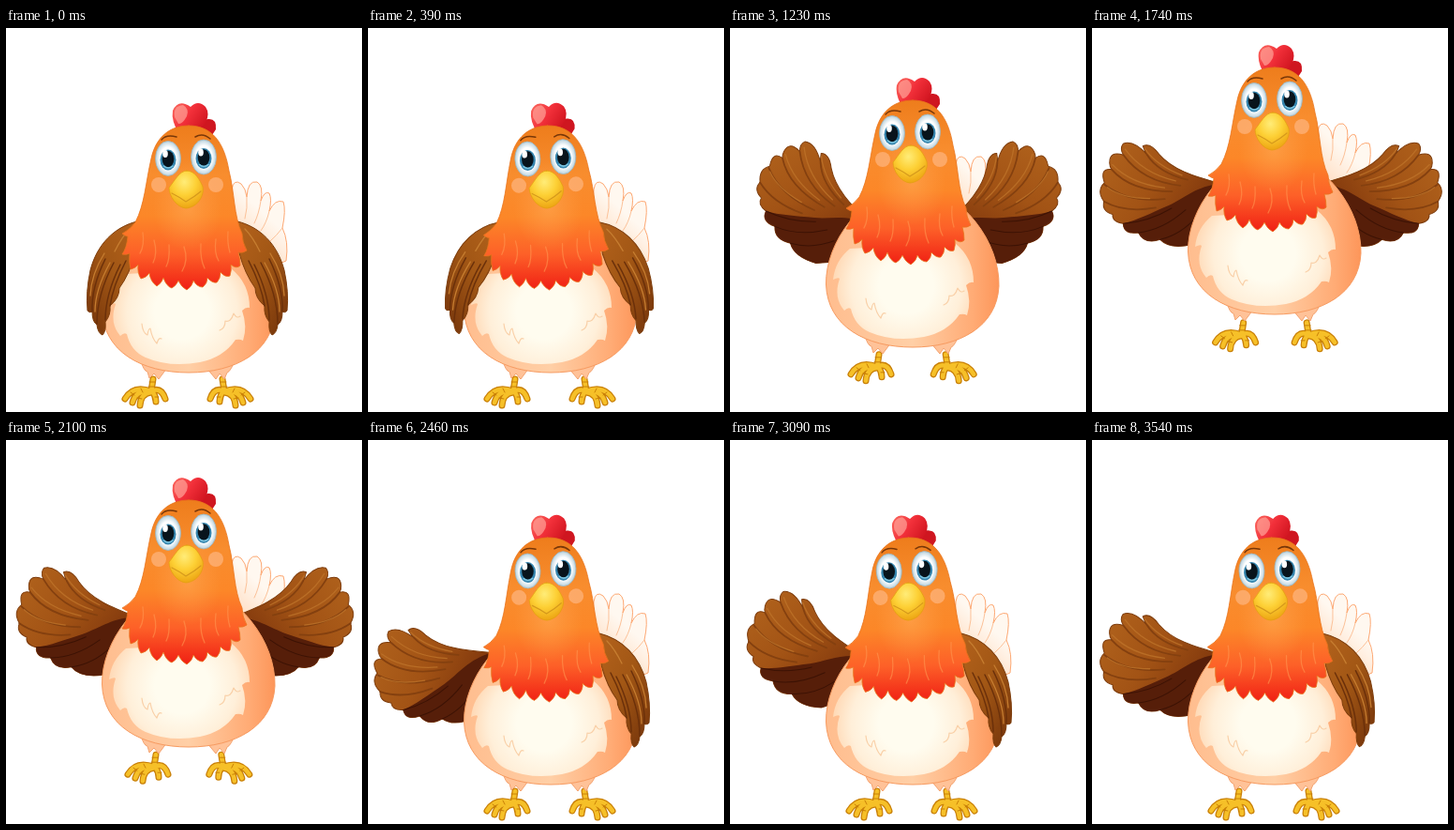
An HTML page that plays this animation: 380x409 px, repeating every 3570 ms.

```html
<!DOCTYPE html>
<html lang="en">
<head>
<meta charset="utf-8">
<title>Waving hen</title>
<style>
  html, body { margin: 0; height: 100%; overflow: hidden; background: #fff; }
  svg { display: block; }
  path { stroke-linecap: round; stroke-linejoin: round; }
</style>
</head>
<body>
<svg width="380" height="409" viewBox="0 0 380 409">
  <defs>
    <linearGradient id="neckFill" x1="0" y1="0" x2="0" y2="1">
      <stop offset="0" stop-color="#ee7d1c"/><stop offset=".3" stop-color="#f88d2e"/>
      <stop offset=".55" stop-color="#fc8728"/><stop offset=".78" stop-color="#fd6028"/>
      <stop offset="1" stop-color="#f01f14"/>
    </linearGradient>
    <radialGradient id="neckGlow">
      <stop offset="0" stop-color="#ffaa55" stop-opacity=".6"/><stop offset="1" stop-color="#ffa24c" stop-opacity="0"/>
    </radialGradient>
    <linearGradient id="bodyFill">
      <stop offset="0" stop-color="#ffbd8e"/><stop offset=".5" stop-color="#ffcfa6"/>
      <stop offset=".85" stop-color="#ffab75"/><stop offset="1" stop-color="#fd965a"/>
    </linearGradient>
    <radialGradient id="bellyFill" gradientUnits="userSpaceOnUse" cx="188" cy="302" r="84">
      <stop offset=".35" stop-color="#fffcef"/><stop offset=".7" stop-color="#ffefd9"/><stop offset="1" stop-color="#ffd3ac"/>
    </radialGradient>
    <linearGradient id="foldFill" x1="1" y1="0" x2=".2" y2="1">
      <stop offset="0" stop-color="#b3621c"/><stop offset=".5" stop-color="#a25715"/><stop offset="1" stop-color="#7a380c"/>
    </linearGradient>
    <linearGradient id="wingFill" x1="0" y1="0" x2="1" y2=".6">
      <stop offset="0" stop-color="#b2641d"/><stop offset=".5" stop-color="#a25315"/><stop offset="1" stop-color="#7a320b"/>
    </linearGradient>
    <linearGradient id="tailFill" x1=".8" y1="0" x2=".2" y2="1">
      <stop offset=".35" stop-color="#fff8f0"/><stop offset="1" stop-color="#ffcfaa"/>
    </linearGradient>
    <radialGradient id="beakFill" cx=".45" cy=".3" r=".7">
      <stop offset="0" stop-color="#ffec78"/><stop offset=".5" stop-color="#fdd035"/><stop offset="1" stop-color="#eda513"/>
    </radialGradient>
    <radialGradient id="eyeFill">
      <stop offset=".65" stop-color="#fff"/><stop offset="1" stop-color="#b9d2de"/>
    </radialGradient>
    <linearGradient id="combFill" x1="0" y1="0" x2="1" y2=".6">
      <stop offset="0" stop-color="#fb6a60"/><stop offset=".5" stop-color="#f2303a"/><stop offset="1" stop-color="#d0141f"/>
    </linearGradient>
    <clipPath id="lidClip"><rect id="lidRect" x="150" y="118" width="90" height="0"/></clipPath>

    <g id="spread">
      <path fill="url(#wingFill)" stroke="#7d3b0b" d="M138 228C108 219 87 212 73 195Q64 182 56 186Q58 192 60 195Q46 179 35 183Q31 188 35 195Q20 190 20 203Q20 207 22 210Q9 208 14 224Q5 232 13 244Q10 254 22 258Q21 266 33 268Q33 280 49 278Q55 291 72 286Q82 297 106 292L138 272Z"/>
      <path fill="#561e09" d="M138 228C112 230 100 242 82 250C62 258 48 265 33 268Q33 280 49 278Q55 291 72 286Q82 297 106 292L138 272Z"/>
      <path fill="none" stroke="#84400f" stroke-width="1.8" d="M35 195Q55 224 95 229M22 210Q42 234 86 235M14 226Q38 246 78 243M13 244Q35 257 68 252M60 195Q72 215 103 223"/>
      <path fill="none" stroke="#bf742a" stroke-width="1.3" opacity=".8" d="M37 189Q55 215 90 224M23 205Q42 226 78 231M17 229Q32 241 62 242M58 189Q71 208 97 218"/>
      <path fill="none" stroke="#3c1204" d="M49 278Q75 276 100 255M72 286Q95 281 112 262M33 268Q60 267 85 253"/>
    </g>
    <g id="folded">
      <path fill="url(#foldFill)" stroke="#7d3d0c" d="M140 206C115 212 97 231 90 258Q85 281 87 301Q89 304 92 302Q92 313 97 316Q98 325 103 327Q107 323 106 313Q112 306 111 296Q121 288 121 277Q132 262 138 240Z"/>
      <path fill="none" stroke="#6b300a" stroke-width="1.5" d="M92 302Q91 276 106 246M97 315Q97 284 115 250M106 311Q106 284 122 252M111 296Q114 275 128 248"/>
      <path fill="none" stroke="#c67d30" stroke-width="1.3" d="M90 285Q91 262 105 240M95 302Q95 279 111 250M116 238Q124 222 132 214"/>
    </g>
    <path id="foot" fill="none" d="M157 374L155 387Q136 380 127 395M153 387Q139 385 135 399M155 388Q144 389 143 402M156 387Q160 392 160 398M157 386Q166 383 170 395"/>
    <g id="leg">
      <use href="#foot" stroke="#c98008" stroke-width="7"/>
      <use href="#foot" stroke="#f6c028" stroke-width="4.5"/>
      <path fill="none" stroke="#c98008" d="M153 377h6M152 382h6M144 384l2 4M133 388l4 3M140 394l5 1M159 393h4"/>
    </g>
    <g id="eye">
      <ellipse cx="173" cy="139" rx="13.500" ry="18.500" fill="url(#eyeFill)" stroke="#9db6c0" stroke-width=".8"/>
      <ellipse cx="173" cy="140.500" rx="8.500" ry="11" fill="#3585ae"/>
      <ellipse cx="173" cy="139.500" rx="6.300" ry="8.800" fill="#08141c"/>
      <path fill="none" stroke="#7cc4df" stroke-width="1.600" d="M168.500 147Q173 151 178 147"/>
      <ellipse cx="170" cy="134" rx="2.800" ry="4" fill="#fff"/>
    </g>
  </defs>

  <g id="hen">
    <path fill="url(#tailFill)" stroke="#fda873" d="M238 245L241 172Q243 160 251 166Q256 171 257 180Q258 162 268 164Q275 168 272 184Q276 173 281 176Q284 182 281 195Q287 182 296 185Q299 194 295 213Q302 227 299 248L275 258Z"/>
    <path fill="none" stroke="#fcc198" d="M257 180Q258 192 255 203M272 184Q270 198 265 208M281 195Q278 208 272 216M295 213Q289 221 282 227"/>
    <g id="spreadL"><use href="#spread"/></g>
    <g transform="matrix(-1 0 0 1 382 0)"><g id="spreadR"><use href="#spread"/></g></g>
    <g id="legL"><use href="#leg"/></g>
    <g id="legR"><use href="#leg" transform="matrix(-1 0 0 1 388 0)"/></g>
    <path fill="#ffc298" stroke="#f5a370" d="M143 352Q147 366 151 366L153 373L158 368L163 374L172 362ZM245 352Q240 366 236 367L233 374L228 368L224 374L214 362Z"/>
    <path fill="url(#bodyFill)" stroke="#f79b61" d="M195 190C250 203 288 255 287 302C285 345 245 367 195 367C145 367 104 345 102.500 300C102 255 140 203 195 190Z"/>
    <path fill="url(#bellyFill)" d="M128 262Q112 275 110 295Q116 292 117 294Q110 314 122 328Q126 324 129 326Q133 344 149 351Q175 362 207 356Q232 351 245 332Q250 331 253 333Q258 318 252 301Q256 297 260 298Q260 272 240 256Z"/>
    <path fill="none" stroke="#f9d0a8" stroke-width="1.2" d="M145 315Q146 325 151 327Q152 320 154 320Q156 331 161 336Q163 329 166 331M228 322Q234 320 234 312Q240 314 243 304Q246 310 250 307"/>
    <g id="foldL"><use href="#folded"/></g>
    <g transform="matrix(-1 0 0 1 387 0)"><g id="foldR"><use href="#folded"/></g></g>
    <g id="head">
      <path fill="#cf1620" d="M203 110Q207 96 217 97Q225 97 224 108L218 117Z"/>
      <path fill="url(#combFill)" d="M185 113Q176 99 178 88Q184 75 197 84Q205 76 213 84Q218 91 213 101Q208 106 206 112Z"/>
      <path fill="#ffa398" opacity=".7" d="M180 95Q178 83 189 82Q196 86 193 94Q188 103 184 102Z"/>
      <path fill="url(#neckFill)" stroke="#e9741c" stroke-width=".8" d="M195 104C175 104 160 116 155 139C149 165 148 188 138 207Q132 215 124 219Q128 222 130 222Q129 234 124 241Q129 242 132 240Q131 250 133 257Q138 256 141 252Q140 261 144 267Q150 266 153 261Q154 270 161 275Q166 272 168 266Q171 275 177 277Q182 274 184 269Q187 276 193 279Q199 275 200 269Q204 276 210 276Q215 272 215 266Q220 272 225 271Q229 267 229 260Q234 266 239 264Q241 258 240 252Q246 257 250 253Q250 246 248 239Q253 240 257 237Q252 228 252 219C243 200 244 175 238 152C233 122 220 104 195 104Z"/>
      <ellipse cx="194" cy="190" rx="37" ry="48" fill="url(#neckGlow)"/>
      <path fill="none" stroke="#ff9750" stroke-width="1.3" opacity=".6" d="M146 218Q148 231 143 240M158 226Q162 240 157 250M174 231Q175 247 171 254M190 233Q195 247 188 259M208 230Q207 246 212 256M224 225Q222 240 227 248M237 217Q236 229 239 239"/>
      <g fill="#ffb987" opacity=".65"><ellipse cx="163" cy="167" rx="8" ry="8"/><ellipse cx="224" cy="167" rx="8" ry="8"/></g>
      <use href="#eye"/>
      <use href="#eye" transform="translate(38 -1.500)"/>
      <g clip-path="url(#lidClip)" fill="#aa4f10" stroke="#793109">
        <ellipse cx="173" cy="139" rx="14" ry="19"/><ellipse cx="211" cy="137.500" rx="14" ry="19"/>
      </g>
      <path id="lidEdge" fill="none" stroke="#5b230a" stroke-width="2.500" d="M160 0H186M198 0H224"/>
      <path fill="none" stroke="#793708" stroke-width="1.500" d="M166 119Q171 113 182 116M202 116Q210 111 218 118"/>
      <path fill="url(#beakFill)" stroke="#e4a012" stroke-width=".8" d="M193 152C202 152 207 162 210 169C212 178 205 191 192 192C182 191 174 179 174 170C180 163 185 152 193 152Z"/>
      <path fill="none" stroke="#d69a1c" stroke-width="1.200" d="M177 176Q185 180 192 185Q201 180 208 174"/>
    </g>
  </g>
</svg>
<script>
const LOOP = 3570, STEP = 30, SWAY = 620, UNFURL = 990, REFOLD = 2320;
const $ = id => document.getElementById(id);

// Interpolates through [time, value] pairs, with an optional easing curve.
function follow(keys, t, curve = p => p) {
  const i = keys.findIndex(k => k[0] > t);
  if (i === 0) return keys[0][1];
  if (i < 0) return keys[keys.length - 1][1];
  const [t0, a] = keys[i - 1], [t1, b] = keys[i];
  return a + (b - a) * curve((t - t0) / (t1 - t0));
}
const cosine = p => (1 - Math.cos(Math.PI * p)) / 2;
const ease = (keys, t) => follow(keys, t, cosine);

const jump = [[1050, 0], [1110, -8], [1230, -27], [1420, -43], [1620, -56], [1740, -62], [1860, -67],
  [1980, -60], [2160, -30], [2250, -12], [2320, 0]];
const flap = [[960, -40], [1050, -12], [1230, 28], [1420, -10], [1610, 28], [1800, -10], [1990, 28], [2180, -10],
  [2320, 12], [2460, -12], [2670, 15], [2880, -12], [3090, 15], [3450, -12], [3660, 15]];
const fold = [[880, 0], [UNFURL, 40], [REFOLD, 40], [2430, 0]];
const tilt = [[2300, 0], [2460, -1.3], [3090, -1.7], [3540, -1.3]];
const blink = [[660, 0], [760, 23], [820, 23], [930, 0]];

const set = (id, transform) => $(id).setAttribute("transform", transform);
const show = (id, on) => $(id).setAttribute("visibility", on ? "visible" : "hidden");

function draw(t) {
  const phase = 2 * Math.PI * t / SWAY;
  const idle = t < 1085;
  const y = follow(jump, t), air = -y / 67;
  const sway = (idle ? 1.8 : 0.6) * (1 - Math.cos(phase));
  const foldAngle = ease(fold, t) + sway;
  const leftOut = t >= UNFURL, rightOut = leftOut && t < REFOLD;

  set("hen", `translate(0 ${y})`);
  set("head", `rotate(${idle ? 1.9 * Math.sin(phase) : ease(tilt, t)} 194 250)`);
  set("legL", `translate(${5 * air} ${2 * air})`);
  set("legR", `translate(${-2 * air} ${2 * air})`);
  for (const [side, out] of [["L", leftOut], ["R", rightOut]]) {
    show("spread" + side, out);
    show("fold" + side, !out);
    set("spread" + side, `rotate(${ease(flap, t)} 128 256)`);
    set("fold" + side, `rotate(${foldAngle} 128 216)`);
  }
  const lid = ease(blink, t);
  $("lidRect").setAttribute("height", lid);
  set("lidEdge", `translate(0 ${118 + lid})`);
  show("lidEdge", lid > 12);
}

function tick() {
  const t = performance.now() % LOOP;
  draw(Math.floor(t / STEP) * STEP);
  requestAnimationFrame(tick);
}
tick();
</script>
</body>
</html>
```
